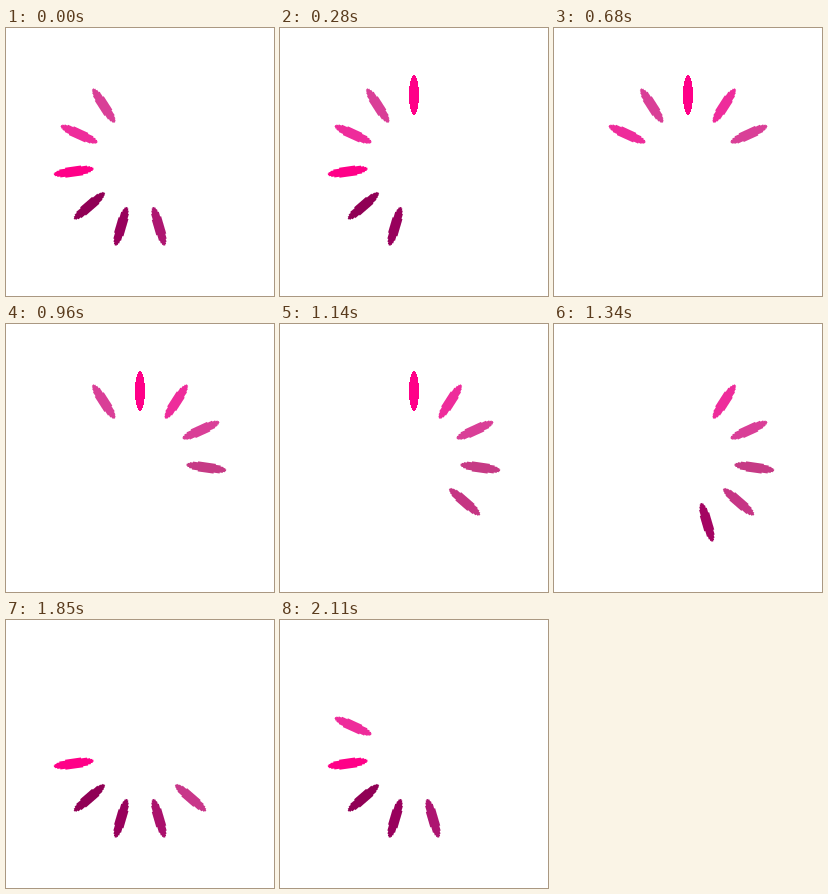
These frames come from a looping animation (268x268 px, 2130 ms). An HTML page:

```html
<!DOCTYPE html>
<html lang="en">
<head>
<meta charset="utf-8">
<title>Petal spinner</title>
<style>
  html, body { margin: 0; width: 100%; height: 100%; overflow: hidden; background: #fff; }
  svg { display: block; width: 100%; height: 100%; }
</style>
</head>
<body>
<svg viewBox="0 0 268 268" shape-rendering="crispEdges"></svg>
<script>
  const LOOP = 2130;
  const COUNT = 11;
  const FIRST_ON = 192;
  const CENTER = 134;

  // Fill when a petal appears and just before it vanishes; repeats every eight petals.
  const FILLS = [
    ['#ff0088', '#ff0088'],
    ['#ee2c9b', '#ee2c9b'],
    ['#d93f97', '#d93f97'],
    ['#c63a85', '#c63a85'],
    ['#c43481', '#c9388c'],
    ['#a2005f', '#ae1873'],
    ['#98005c', '#98005c'],
    ['#900055', '#900055'],
  ];

  const svg = document.querySelector('svg');

  function addPetal(i) {
    const petal = document.createElementNS(svg.namespaceURI, 'ellipse');
    const attrs = {
      cx: CENTER, cy: 67, rx: 5, ry: 20,
      transform: `rotate(${i * 360 / COUNT} ${CENTER} ${CENTER})`,
    };
    for (const name in attrs) petal.setAttribute(name, attrs[name]);
    svg.append(petal);

    const [from, to] = FILLS[i % FILLS.length];
    petal.animate([
      { offset: 0, opacity: 1, fill: from },
      { offset: 0.5, opacity: 1, fill: to },
      { offset: 0.5, opacity: 0, fill: to },
      { offset: 1, opacity: 0, fill: to },
    ], {
      duration: LOOP,
      iterations: Infinity,
      delay: FIRST_ON + i * LOOP / COUNT - LOOP,
    });
  }

  for (let i = 0; i < COUNT; i++) addPetal(i);
</script>
</body>
</html>
```
